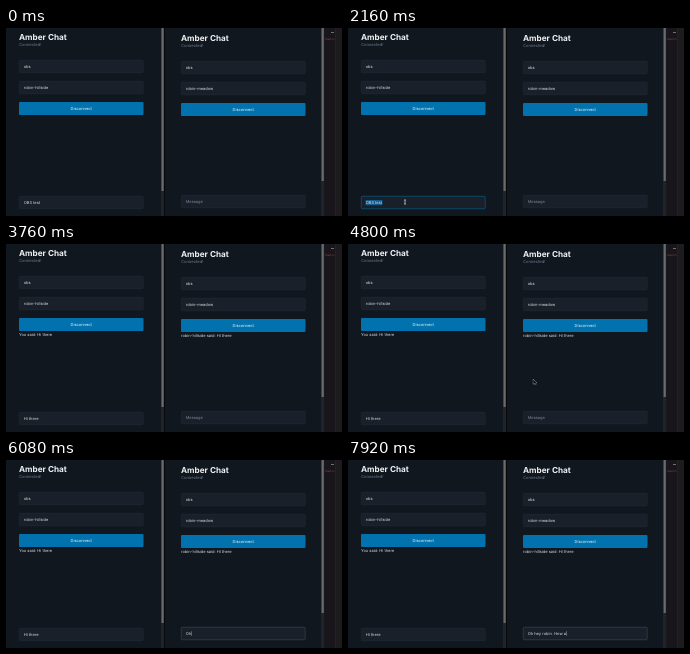
Animation of 336x188 px, one loop 8000 ms. Source, as an HTML page with a canvas:

```html
<!DOCTYPE html>
<html lang="en">
<head>
<meta charset="utf-8">
<title>Amber Chat</title>
<style>
html, body { margin: 0; width: 100%; height: 100%; overflow: hidden; background: #11171f; }
canvas { display: block; width: 336px; height: 188px; }
</style>
</head>
<body>
<canvas id="stage"></canvas>
<script>
const W = 336, H = 188, LOOP = 8000;
const canvas = document.getElementById('stage');
const dpr = window.devicePixelRatio || 1;
canvas.width = W * dpr;
canvas.height = H * dpr;
const ctx = canvas.getContext('2d');

// Typed text: [time, characters shown]
const leftKeys = [[2320, 1], [2480, 2], [2640, 3], [2800, 5], [2960, 7], [3040, 8]];
const rightKeys = [[5760, 1], [5920, 2], [6240, 3], [6400, 4], [6560, 5], [6720, 6], [6880, 7],
  [6960, 8], [7120, 9], [7200, 10], [7280, 12], [7440, 13], [7600, 15], [7680, 17], [7760, 18], [7920, 19]];

// Pointer paths: [time, x, y]
const paths = [
  [[320, 0, 104], [560, 38, 88], [800, 62, 82], [960, 64, 84], [1120, 57, 177], [1520, 57, 176], [2000, 57, 174], [2320, 57, 174]],
  [[4320, 61, 175], [4400, 84, 181], [4480, 115, 185], [4560, 130, 192]],
  [[4720, 158, 180], [4880, 212, 92], [5040, 220, 84], [5120, 206, 168], [5280, 205, 174], [5760, 205, 174]]
];

const clamp = v => Math.max(0, Math.min(1, v));
const fade = (t, on, off, d = 200) => clamp((t - on) / d) * (1 - clamp((t - off) / d));
const mix = (a, b, k) => `rgb(${a.map((v, i) => Math.round(v + (b[i] - v) * k))})`;
const typed = (text, keys, t) => text.slice(0, keys.reduce((n, k) => t >= k[0] ? k[1] : n, 0));

function rect(x, y, w, h, color) {
  ctx.fillStyle = color;
  ctx.fillRect(x, y, w, h);
}

function box(x, y, w, h, fill, border) {
  ctx.beginPath();
  ctx.roundRect(x, y, w, h, 1);
  ctx.fillStyle = fill;
  ctx.fill();
  if (border) {
    ctx.lineWidth = 0.5;
    ctx.strokeStyle = border;
    ctx.stroke();
  }
}

function label(text, x, y, color = '#d9dde2', size = 4, weight = 400, align = 'left') {
  ctx.font = `${weight} ${size}px Inter, sans-serif`;
  ctx.textAlign = align;
  ctx.fillStyle = color;
  ctx.fillText(text, x, y);
  return ctx.measureText(text).width;
}

function field(x, y, text, border = '#252c38', color) {
  box(x + 0.25, y + 0.25, 124, 12.5, '#1a202a', border);
  return label(text, x + 4.7, y + 7.9, color);
}

function panel(x, y, name, hover, note) {
  label('Amber Chat', x, y + 11.6, '#f0f1f3', 8.2, 700);
  label('Connected!', x, y + 17.9, '#747d8c', 4.1);
  field(x, y + 32, 'obs');
  field(x, y + 53, name);
  box(x, y + 74, 124.5, 13, mix([1, 114, 173], [1, 127, 192], hover));
  label('Disconnect', x + 62.2, y + 82.2, '#f4f8fb', 4, 400, 'center');
  if (note) label(note, x, y + 92.3);
}

function pointer(t) {
  const path = paths.find(p => t >= p[0][0] && t < p[p.length - 1][0]);
  if (!path) return;
  const i = path.findIndex(p => p[0] > t);
  const a = path[i - 1], b = path[i];
  const k = (t - a[0]) / (b[0] - a[0]);
  const x = a[1] + (b[1] - a[1]) * k, y = a[2] + (b[2] - a[2]) * k;
  const overField = y > 166 && y < 182 && (x > 13 && x < 138 || x > 175 && x < 299);
  ctx.beginPath();
  if (overField) {
    ctx.moveTo(x - 1, y - 2.2);
    ctx.lineTo(x, y - 1.8);
    ctx.lineTo(x + 1, y - 2.2);
    ctx.moveTo(x, y - 1.8);
    ctx.lineTo(x, y + 1.8);
    ctx.moveTo(x - 1, y + 2.2);
    ctx.lineTo(x, y + 1.8);
    ctx.lineTo(x + 1, y + 2.2);
    ctx.lineWidth = 0.7;
    ctx.strokeStyle = '#dfe3e8';
    ctx.stroke();
  } else {
    [[0, 0], [0, 4.6], [1.1, 3.6], [1.9, 5.2], [2.6, 4.9], [1.9, 3.4], [3.3, 3.3]]
      .forEach(p => ctx.lineTo(x + p[0], y + p[1]));
    ctx.closePath();
    ctx.lineWidth = 0.6;
    ctx.strokeStyle = '#e6e8ea';
    ctx.stroke();
    ctx.fillStyle = '#080a0c';
    ctx.fill();
  }
}

function draw(t) {
  ctx.setTransform(dpr, 0, 0, dpr, 0, 0);
  ctx.textRendering = 'geometricPrecision';
  rect(0, 0, W, H, '#11171f');

  // Window edges, scrollbars and the strip behind
  rect(155, 0, 4, H, '#20242a');
  rect(155.5, 0, 2.2, 163, '#696b6d');
  rect(158, 0, 1, H, '#08090b');
  rect(315, 0, 3.5, H, '#20242a');
  rect(315.6, 0, 2.2, 153, '#696b6d');
  rect(318.5, 0, 17.5, H, '#18161a');
  rect(329, 0, 7, H, '#1d1b1e');
  rect(329, 0, 0.5, H, '#2c292c');
  rect(325, 4, 3, 0.8, '#8d8588');
  label('main.rs', 319, 11.8, '#8b4a48', 2.8);

  const sent = t >= 3760;
  panel(13, 0, 'robin-hillside', fade(t, 640, 1080), sent && 'You said: Hi there');
  panel(175, 1, 'robin-meadow', fade(t, 4880, 5100), sent && 'robin-hillside said: Hi there');

  const focusL = fade(t, 1240, 3180);
  const borderL = mix([37, 44, 56], [1, 114, 173], focusL);
  const textL = t < 2320 ? 'OBS test' : typed('Hi there', leftKeys, t);
  const wL = field(13, 168, textL, borderL);
  if (t >= 1760 && t < 2320) {
    rect(17.5, 172, wL + 0.5, 5.2, '#155d8d');
    label(textL, 17.7, 175.9);
  } else if (t >= 2320 && t < 3200) {
    rect(18 + wL, 172.2, 0.4, 4.6, '#c4cbd3');
  }

  const focusR = fade(t, 5180, 9000);
  const textR = typed('Oh hey robin. How a', rightKeys, t);
  const wR = field(175, 167, textR || 'Message', mix([37, 44, 56], [66, 80, 96], focusR),
    textR ? undefined : '#7b8495');
  const blink = t >= 5200 && t < 5600 || t >= 5760;
  if (blink) rect(179.8 + (textR ? wR : 0), 171.2, 0.4, 4.6, '#c4cbd3');

  pointer(t);
}

const start = performance.now();
function tick(now) {
  draw(Math.max(0, now - start) % LOOP);
  requestAnimationFrame(tick);
}
draw(0);
requestAnimationFrame(tick);
</script>
</body>
</html>
```
